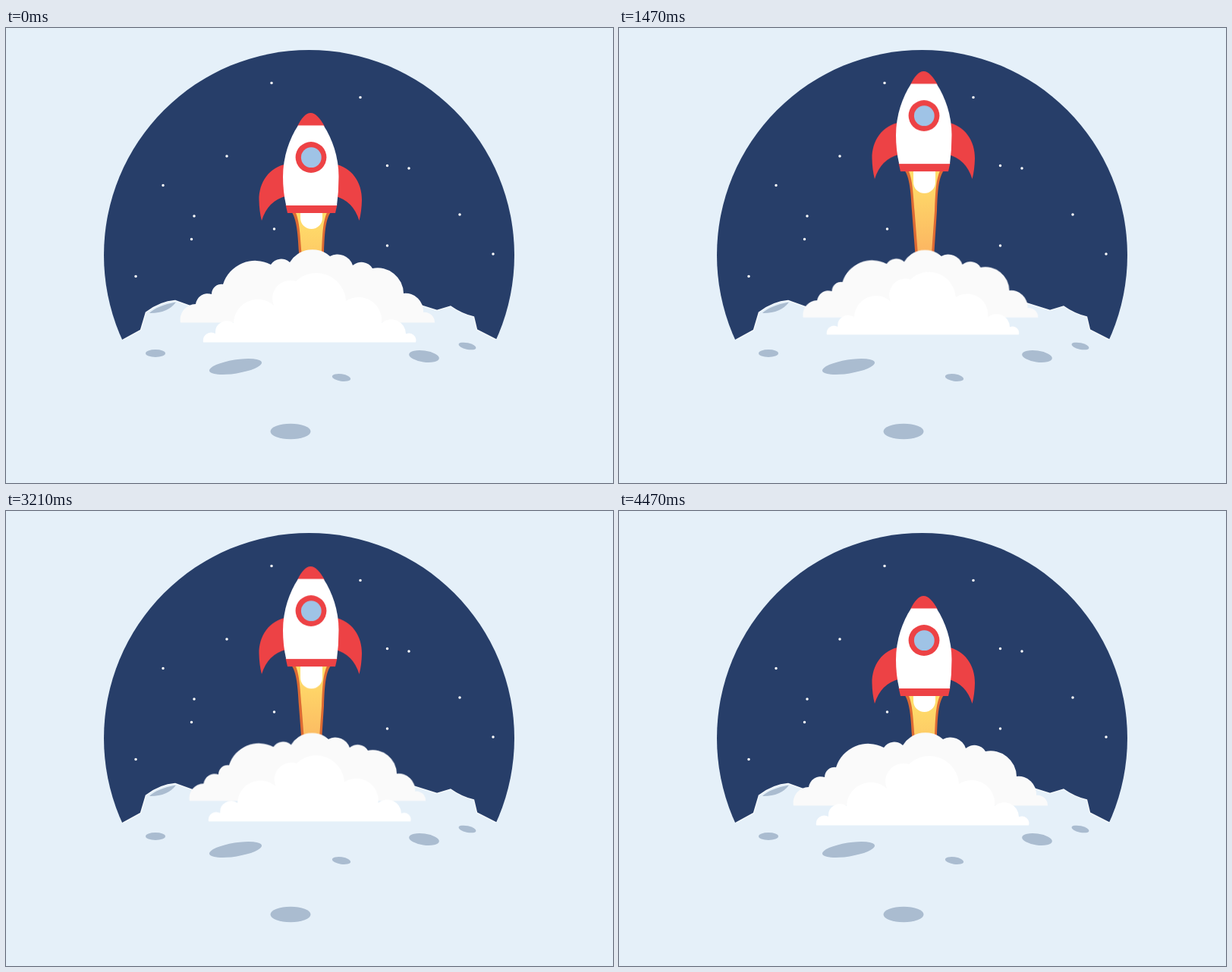
An HTML page that plays this animation: 800 px wide and 600 px high, repeating every 4500 ms.

```html
<!DOCTYPE html>
<html lang="en">
<head>
<meta charset="utf-8">
<title>Rocket launch</title>
<style>
  html, body { margin: 0; width: 100%; height: 100%; overflow: hidden; background: #e5f0f9; }
  svg { display: block; width: 100%; height: 100%; }
  .ground { fill: #e5f0f9; }
  .red { fill: #ed4245; }
  #back { fill: #fafafa; transform-origin: 397.5px 299.5px; }
  #front { fill: #fff; transform-origin: 403px 309px; }
</style>
</head>
<body>
<svg viewBox="0 0 800 600">
  <defs>
    <linearGradient id="fire" gradientUnits="userSpaceOnUse" x1="0" y1="250" x2="0" y2="370">
      <stop offset="0" stop-color="#ffde6a"/>
      <stop offset="1" stop-color="#fbae60"/>
    </linearGradient>
  </defs>

  <circle cx="399.5" cy="299.5" r="270.5" fill="#273e69"/>
  <path stroke="#fff" stroke-width="3.5" stroke-linecap="round"
    d="M350 72.5h0M467 91.5h0M291 169h0M207 207.500h0M248 248h0M244.500 278.500h0M171 327.500h0
       M353.500 265h0M502.500 181.500h0M531 185h0M598 246h0M502.500 287h0M642 298h0"/>

  <path class="ground" stroke="#f4f9fd" stroke-width="1.5"
    d="M152 412.500 177.500 398.500 184.500 375Q203 361 223 359.500L248 368.500H533V361.500L568 372.500 586 367Q600 377 616.500 381L620.500 398 647 411.500"/>
  <rect class="ground" y="411" width="800" height="189"/>
  <g fill="#aabcd0">
    <path d="M189 376Q199 366 224 361.500Q213 376.500 189 376Z"/>
    <ellipse cx="197" cy="429" rx="13" ry="5"/>
    <ellipse cx="375" cy="532" rx="26.500" ry="10.300"/>
    <ellipse rx="35" ry="9" transform="translate(302.500 446.500) rotate(-9)"/>
    <ellipse rx="12.300" ry="4.700" transform="translate(442 461) rotate(8)"/>
    <ellipse rx="20" ry="7.500" transform="translate(551 433) rotate(8)"/>
    <ellipse rx="11.700" ry="4.300" transform="translate(608 419.500) rotate(12)"/>
  </g>

  <g class="lift">
    <path fill="#dd6a33" d="M373 238C383 248 384.500 268 386 296L392.500 380H413.500L419 296C420 268 421 248 432 238Z"/>
    <path fill="url(#fire)" d="M379 238C387 250 387.500 272 389.500 296L396 380H410L416 296C417 272 417.500 250 426 238Z"/>
  </g>
  <rect id="core" x="388" y="220" width="29" height="45" rx="14.500" fill="#fff"/>

  <g class="lift">
    <g class="red">
      <path id="fin" d="M370 179.500C347 183 333 204 333.500 227Q333.800 242 337 254Q345 227.500 370 221.500Z"/>
      <use href="#fin" transform="matrix(-1 0 0 1 802.500 0)"/>
      <path d="M384 130C389 119 395 112 401.500 112S414 119 420 130Z"/>
      <path d="M368.500 233H436.500L434 244H371Z"/>
    </g>
    <path fill="#fff" d="M385 128.500H418.500C430 146 438.500 170 438.500 196Q438.500 216 436 234H369.200Q365 216 365 196C365 170 373.500 146 385 128.500Z"/>
    <circle class="red" cx="402" cy="170.500" r="20.400"/>
    <circle cx="402.300" cy="170.700" r="13.400" fill="#9fc3e6"/>
  </g>

  <path id="back"/>
  <path id="front"/>
</svg>
<script>
  const LOOP = 4500;
  const byId = id => document.getElementById(id);

  // Joins the creases of a cloud with bulges; roundness is radius over chord
  function puff(id, roundness, creases) {
    const points = creases.split(' ').map(pair => pair.split(',').map(Number));
    const arcs = points.slice(1).map(([x, y], i) => {
      const r = roundness * Math.hypot(x - points[i][0], y - points[i][1]);
      return `A${r} ${r} 0 0 1 ${x} ${y}`;
    });
    byId(id).setAttribute('d', `M${points[0]}${arcs.join('')}Z`);
  }

  puff('back', .65, '230,388.5 250,364 271,351 286,338 349,312 374,309 427,301 457,313 483,317 524,350 550,375 565,388.5');
  puff('front', .55, '260,414.5 276,403 300,389 353,366 382,334 448,360 495,389 527,403.5 540,414.5');

  // Smooth swing from rest to a pose and back again
  function swing(node, transform, peak, end = LOOP) {
    const easing = 'cubic-bezier(.3333, 0, .6667, 1)';
    node.animate([
      { offset: 0, transform: 'none', easing },
      { offset: peak / LOOP, transform, easing },
      { offset: end / LOOP, transform: 'none' },
      { offset: 1, transform: 'none' }
    ], { duration: LOOP, iterations: Infinity });
  }

  for (const part of document.querySelectorAll('.lift')) swing(part, 'translateY(-70px)', 2100);
  swing(byId('core'), 'translateY(-63px)', 2190, 4200);
  swing(byId('back'), 'scale(.89)', 2340);
  swing(byId('front'), 'scale(.894)', 1800);
</script>
</body>
</html>
```
